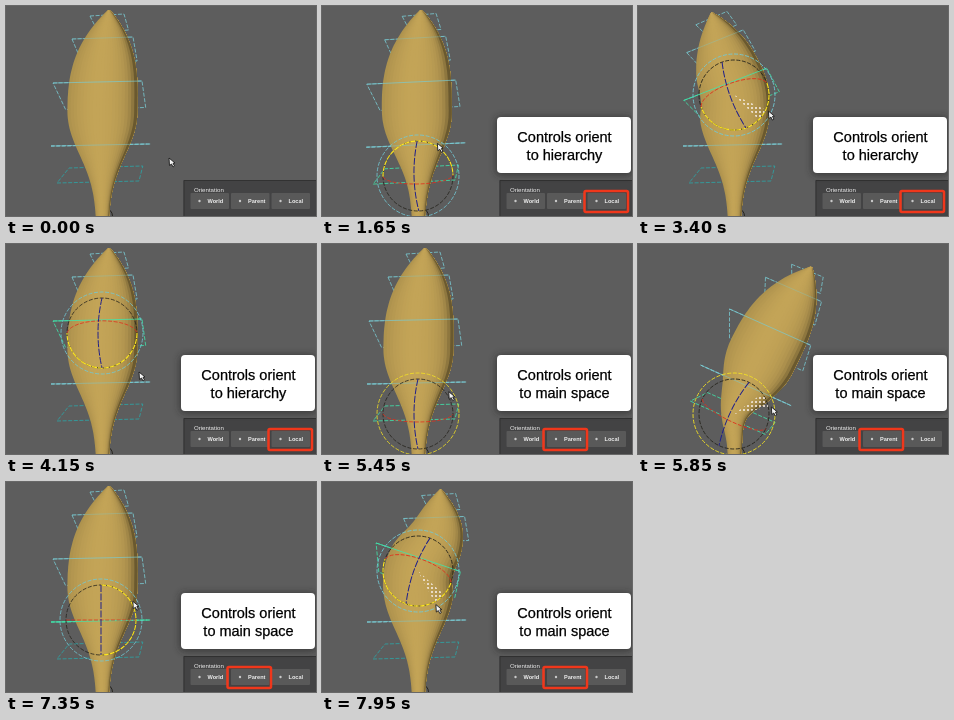
Animation of 310 by 210 pixels, one loop 8 s. Source, as an HTML page:

```html
<!DOCTYPE html>
<html lang="en">
<head>
<meta charset="utf-8">
<title>Control orientation</title>
<style>
html, body { margin: 0; width: 100%; height: 100%; overflow: hidden; background: #5d5d5d; }
svg { display: block; width: 100vw; height: 100vh; }
text { font-family: "Liberation Sans", Arial, sans-serif; }
.btn { font-size: 5.6px; font-weight: bold; fill: #eee; }
.note { font-size: 14.5px; fill: #000; stroke: #000; stroke-width: .25; text-anchor: middle; }
.line { fill: none; stroke-width: .8; stroke-linejoin: round; }
.dash { stroke-dasharray: 4 1.6; }
</style>
</head>
<body>
<svg viewBox="0 0 310 210">
  <defs>
    <pattern id="dots" width="4" height="4" patternUnits="userSpaceOnUse">
      <rect x="1" y="1" width="2" height="2" fill="#f1e6da"/>
    </pattern>
    <filter id="soft" x="-20%" y="-30%" width="140%" height="160%"><feGaussianBlur stdDeviation="3"/></filter>
  </defs>
  <rect width="310" height="210" fill="#5d5d5d"/>
  <g id="back"></g>
  <path d="M101 203Q106 204 106.500 210" class="line" stroke="#16130d"/>
  <g id="body"></g>
  <g id="front"></g>
  <g id="gizmo" class="line">
    <circle id="outer" r="41" class="dash"/>
    <circle r="35" stroke="#25231c" class="dash"/>
    <path id="half" d="M-35 0A35 35 0 0 1 35 0" stroke="#ffe81f" stroke-width="1.100" stroke-dasharray="5 1"/>
    <path id="red" stroke="#e0301e" class="dash"/>
    <path id="blue" stroke="#20208a" stroke-width="1" stroke-dasharray="7 1.500"/>
  </g>
  <path id="wedge" fill="url(#dots)" opacity=".85"/>
  <g id="panel">
    <rect x="177.500" y="174" width="133" height="37" fill="#434344"/>
    <path d="M178 210V174.500H310" class="line" stroke="#2e2e2e"/>
    <text x="188" y="185.500" font-size="6.100" fill="#eee">Orientation</text>
  </g>
  <g id="card">
    <rect x="173" y="110" width="138" height="60" rx="6" fill="#222" opacity=".5" filter="url(#soft)"/>
    <rect x="175" y="111" width="134" height="56" rx="4" fill="#fff"/>
    <text class="note" x="242.500" y="136">Controls orient</text>
    <text class="note" id="noteA" x="242.500" y="153.500">to hierarchy</text>
    <text class="note" id="noteB" x="242.500" y="153.500">to main space</text>
    <rect id="mark" y="185" width="43.500" height="21" rx="1.500" fill="none" stroke="#f0371b" stroke-width="2.500"/>
  </g>
  <path id="cursor" d="M0 0L.5 7.500L2.500 6L4 9L5.500 8L4 5.300L6 5Z" fill="#f4f4f4" stroke="#1b1b1b" stroke-width=".9"/>
</svg>
<script>
const LOOP = 8000, SWING = 640, LEAD = 140, LINGER = 400;
const RING = 38, ROWS = 60, LAYERS = 22, BLEND = 30, EYE = 138;
const $ = id => document.getElementById(id);
const clamp = x => Math.max(0, Math.min(1, x));
const smooth = x => { x = clamp(x); return x * x * (3 - 2 * x); };
const mix = (a, b, k) => a + (b - a) * k;
const mixPt = (p, q, k) => [mix(p[0], q[0], k), mix(p[1], q[1], k)];
const toPath = pts => "M" + pts.map(p => p.map(v => v.toFixed(1)).join(" ")).join("L");

function add(parent, tag, attrs) {
  const el = document.createElementNS("http://www.w3.org/2000/svg", tag);
  for (const k in attrs) el.setAttribute(k, attrs[k]);
  return $(parent).appendChild(el);
}

function polar([x, y], r, deg) {
  const a = deg * Math.PI / 180;
  return [x + r * Math.cos(a), y + r * Math.sin(a)];
}

// Joints from base to tip
const pivots = [[96, 170], [95, EYE], [96, 89], [98, 43]];

// Flat squares seen in perspective from eye height
function square(joint, x, y, w, depth, over) {
  const pts = [[x - w, y + 1], [x + w, y - 1], [x + w * .97 + 5, y - 1 + depth], [x - w * .83 + 5, y + 1 + depth]];
  return {
    joint, over, pts, color: depth < 0 ? "#2ba6a8" : "#79cbd3",
    back: add("back", "path", { class: "line dash" }),
    front: add("front", "path", { class: "line" })
  };
}
const controls = [
  square(0, 92, 176, 41, -15, 0),
  square(1, 93, 139, 48, 0, .6),
  square(2, 91.5, 76, 44.5, 26.5, .85),
  square(3, 96.5, 32, 30.5, 24, .4),
  square(3, 101, 9, 17, 16, 0)
];

// Two passes drag each joint in turn, left and then right
const passes = [
  { begin: 1625, gap: 780, grabs: [-58, -31, 45], swings: [[-33, 32], [-47, 18], [-20, 15]] },
  { begin: 5450, gap: 1026, grabs: [-36, -14, 42], swings: [[-33, 32], [-40, 40], [-18, 20]], main: true }
];
const drags = passes.flatMap(p => p.grabs.map((grab, joint) => ({
  joint, grab, main: p.main, swing: p.swings[joint], start: p.begin + p.gap * joint
})));

function turnAt(drag, t) {
  const k = (t - drag.start) / SWING, [a, b] = drag.swing;
  if (k < .33) return a * smooth(k / .33);
  return k < .7 ? mix(a, b, smooth((k - .33) / .37)) : b * (1 - smooth((k - .7) / .3));
}
const grip = (d, turn) => polar(pivots[d.joint], RING, d.grab + turn);

// Pointer stops between drags
const stops = [[50, 163, 152], [400, 288, 194], [800, 288, 194], [801, 137, 128], [950, 137, 128],
  [1250, 129, 160], [4100, 133, 128], [4250, 133, 128], [4550, 243, 192], [4720, 240, 190], [5150, 128, 160],
  ...drags.flatMap(d => [d.start, d.start + SWING].map(t => [t, ...grip(d, 0)]))
].sort((a, b) => a[0] - b[0]);

function pointerAt(t) {
  const i = stops.findIndex(s => s[0] > t);
  if (i <= 0) return stops[0].slice(1);
  const a = stops[i - 1], b = stops[i];
  return mixPt(a.slice(1), b.slice(1), smooth((t - a[0]) / (b[0] - a[0])));
}

// Leaf outline: power curve above the widest row, bell curve below
const outline = Array.from({ length: ROWS + 1 }, (_, i) => {
  const y = 4 + 210 * i / ROWS, d = y - 104;
  const half = d < 0 ? 35 - 34 * (-d / 100) ** 2.8 : 6 + 29 * Math.exp(-((d / 59) ** 2.2));
  const mid = 96.4 + 6.6 * clamp(-d / 100) ** 1.6;
  return [y, mid - half, mid + half];
});

const layers = Array.from({ length: LAYERS }, (_, i) => {
  const u = i / LAYERS, k = 1 - .6 * (u - .42) ** 2 - .6 * u ** 16;
  return { u, el: add("body", "path", { fill: `rgb(${[195, 164, 87].map(c => Math.round(c * k))})` }) };
});

["World", "Parent", "Local"].forEach((name, i) => {
  const x = 184.5 + i * 40.5, label = x + 17;
  add("panel", "rect", { x, y: 187, width: 38.5, height: 16, rx: 1, fill: "#595959" });
  add("panel", "text", { x: label, y: 197.2, class: "btn" }).textContent = name;
  add("panel", "circle", { cx: label - 8, cy: 195, r: 1.2, fill: "#c9c9c9" });
});

function turnAbout([cx, cy], deg) {
  const [k, s] = polar([0, 0], 1, deg);
  return ([x, y]) => [cx + (x - cx) * k - (y - cy) * s, cy + (x - cx) * s + (y - cy) * k];
}

// One point mapping per joint; in main space the joints above only move along
function pose(drag, turn) {
  if (!drag) return pivots.map(() => p => p);
  const j = drag.joint, next = pivots[j + 1], spin = turnAbout(pivots[j], turn);
  const moved = spin(next);
  const shift = ([x, y]) => [x + moved[0] - next[0], y + moved[1] - next[1]];
  return pivots.map((_, i) => i < j ? p => p : i > j && drag.main && j ? shift : spin);
}

const skin = (maps, p) => maps.reduce((q, map, i) =>
  mixPt(q, map(p), smooth((pivots[i][1] + BLEND - p[1]) / (2 * BLEND))), p);

function drawBody(maps) {
  const column = u => outline.map(([y, l, r]) => skin(maps, [mix(l, r, u), y]));
  const far = column(1).reverse();
  for (const { u, el } of layers) el.setAttribute("d", toPath(column(u).concat(far)) + "Z");
}

function drawControls(maps, picked) {
  controls.forEach((c, i) => {
    const pts = c.pts.map(maps[c.joint]), on = picked === i;
    c.back.setAttribute("d", toPath(pts) + "Z");
    c.front.setAttribute("d", toPath(pts.slice(0, 2)));
    for (const el of [c.back, c.front]) el.setAttribute("stroke", on ? "#3fe6ac" : c.color);
    c.front.setAttribute("opacity", on && c.over ? 1 : c.over);
  });
}

function drawGizmo(drag, turn) {
  $("gizmo").style.display = $("wedge").style.display = drag ? "" : "none";
  if (!drag) return;
  const c = pivots[drag.joint], tilt = (c[1] - EYE) / 4, view = drag.main && !drag.joint;
  $("gizmo").setAttribute("transform", `translate(${c}) rotate(${turn})`);
  $("outer").setAttribute("stroke", view ? "#f5e323" : "#72c9d6");
  $("half").setAttribute("transform", `rotate(${90 * drag.joint})`);
  $("half").style.display = view ? "none" : "";
  $("red").setAttribute("d", `M-35 0C-30 ${tilt * 1.33} 30 ${tilt * 1.33} 35 0`);
  $("blue").setAttribute("d", `M0 -35Q${tilt ? -8 : 0} 0 0 35`);
  const from = polar(c, 35, drag.grab), to = polar(c, 35, drag.grab + turn);
  $("wedge").setAttribute("d", Math.abs(turn) < 2 ? "" : `M${c}L${from}A35 35 0 0 ${+(turn > 0)} ${to}Z`);
}

function render(t) {
  const last = drags.filter(d => t >= d.start - LEAD).pop();
  const drag = last && t < last.start + SWING + LINGER ? last : null;
  const turn = drag ? turnAt(drag, t) : 0;
  const maps = pose(drag, turn);
  drawBody(maps);
  drawControls(maps, drag ? drag.joint : t > 1250 && t < 1500 ? 0 : -1);
  drawGizmo(drag, turn);

  const swap = clamp((t - 4560) / 160);
  $("card").setAttribute("opacity", clamp((t - 560) / 240));
  $("noteA").setAttribute("opacity", 1 - swap);
  $("noteB").setAttribute("opacity", swap);
  $("mark").setAttribute("x", t < 4600 ? 262.5 : 221.5);

  const held = drag && t >= drag.start && t <= drag.start + SWING;
  $("cursor").setAttribute("transform", `translate(${held ? grip(drag, turn) : pointerAt(t)})`);
  $("cursor").style.display = t > 700 && t < 950 ? "none" : "";
}

const start = performance.now();
function tick() {
  render((performance.now() - start) % LOOP);
  requestAnimationFrame(tick);
}
tick();
</script>
</body>
</html>
```
